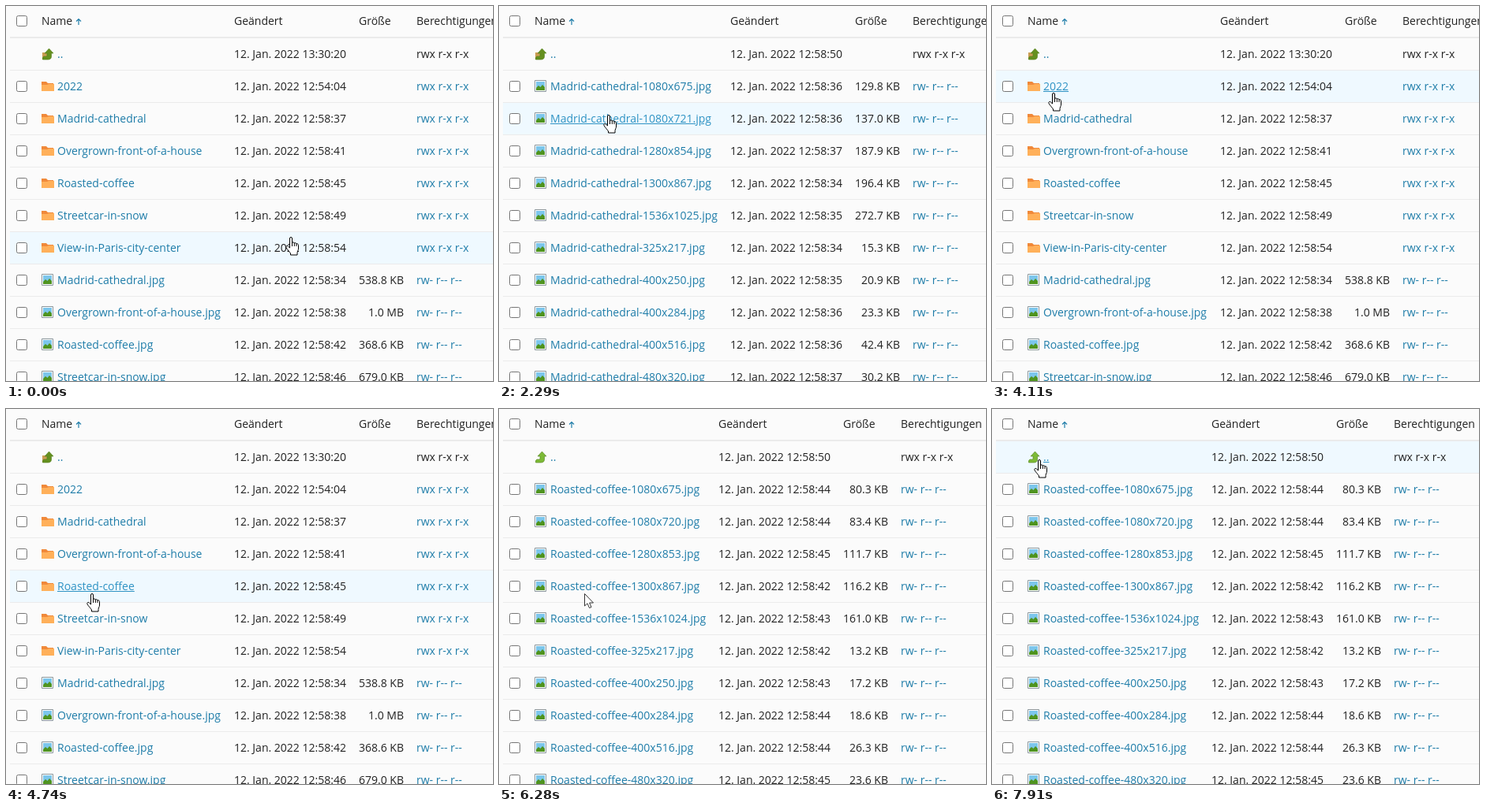
Animation, 617 px wide and 476 px high, one loop 8 s. Source, as an HTML page:

```html
<!DOCTYPE html>
<html lang="de">
<head>
<meta charset="utf-8">
<title>Dateimanager</title>
<style>
html, body { margin: 0; width: 100%; height: 100%; overflow: hidden; background: #fbfbfb; }
#stage { position: relative; width: 617px; height: 476px; overflow: hidden; font: 14px/20px "Open Sans", sans-serif; color: #222; }
.page { position: absolute; inset: 0; visibility: hidden; }
.page.show { visibility: visible; }
.head, .row { position: absolute; left: 5px; right: 0; box-sizing: border-box; height: 41px; border-bottom: 1px solid #ebebeb; }
.head { top: 0; border-bottom: 2px solid #ebebeb; }
.row.hover { background: #eff9ff; }
.head > *, .row > * { position: absolute; top: 10px; white-space: pre; }
.head > * { top: 9px; }
.box { left: 8px; width: 12px; height: 12px; border: 1px solid #767676; border-radius: 2.5px; background: #fff; }
.row .box { top: 13px; }
.head .box { top: 12px; }
.icon { left: 40px; width: 16px; height: 16px; }
.row .icon { top: 12px; }
.link { color: #1f7da9; }
.name { left: 60px; }
.name.over { color: #2f93c4; text-decoration: underline; }
.name.press { color: #1f7da9; }
#click, #hand, #arrow { position: absolute; left: 0; top: 0; overflow: visible; }
#click { width: 24px; height: 24px; margin: -12px; border-radius: 50%; background: #f6ec3c; opacity: .85; mix-blend-mode: multiply; }
</style>
</head>
<body>
<div id="stage">
  <div id="click"></div>
  <svg id="hand" width="18" height="24" fill="#fff" stroke="#000">
    <path d="M5.5 14V2a1.5 1.5 0 0 1 3 0V7.5C9 6.6 11 6.8 11.3 8 12 7.3 13.8 7.6 14 9 15 8.4 16.5 9 16.5 10.5V15C16.5 17 15 18.5 15 20.5V23H6.5V21C5.5 19 2.5 16.5 1 13.6 .2 12 2 10.8 3.2 11.8Z"/>
    <path fill="none" d="M8.5 7v5M11.3 8v4M14 9v3"/>
  </svg>
  <svg id="arrow" width="13" height="20" fill="#fff" stroke="#333">
    <path d="M.5.5V16L4 12.8 6.5 18.5 9 17.5 6.6 12H11.5Z"/>
  </svg>
</div>
<script>
const LOOP = 8000, ROW = 41;
const $ = id => document.getElementById(id);
const stage = $('stage');

const upArrow = color => `<path fill="${color}" stroke="#4f7f1c" stroke-width=".6" d="M9.5 1 15 7H12.5V11Q12.5 15 8 15H1.5Q1 11.5 3 11H6Q7 11 7 9.5V7H4Z"/>`;
const icons = {
  folder: '<path fill="#f0893a" d="M0 2H6L8 4H15V7H0Z"/><path fill="#ffb05a" d="M0 6H7L9 5H16V14H0Z"/>',
  image: '<path fill="#fff" stroke="#8b979c" d="M.5.5H14.5V14.5H.5Z"/><path fill="#7cc6ec" d="M2 2H13V13H2Z"/><path fill="#4f9420" d="M2 10 5 7 7.5 9 10 6 13 9V13H2Z"/>',
  upDark: '<path fill="#c99d52" d="M1 6H9V15H1Z"/>' + upArrow('#65901f'),
  upLight: upArrow('#7dba36')
};
const icon = name => `<svg class="icon">${icons[name]}</svg>`;
const box = '<i class="box"></i>';

function buildRow([name, time, size], i, shift, up) {
  const at = x => `left:${x + shift - 5}px`;
  const parent = i === 0, folder = !size;
  const kind = parent ? up : folder ? 'folder' : 'image';
  return `<div class="row" style="top:${ROW * (i + 1)}px">${parent ? '' : box}${icon(kind)}
    <span class="name link">${name}</span>
    <span style="${at(289)}">12. Jan. 2022 ${time}</span>
    <span style="right:${617 - 504 - shift}px">${size || ''}</span>
    <span class="${parent ? '' : 'link'}" style="${at(520)}">${folder ? 'rwx r-x r-x' : 'rw- r-- r--'}</span></div>`;
}

function buildPage(rows, shift, up) {
  const page = document.createElement('div');
  const title = (x, text) => `<span style="left:${x - 5}px">${text}</span>`;
  page.className = 'page';
  page.innerHTML = `<div class="head">${box}${title(45, 'Name')}
    <svg style="left:83px;top:15px" width="8" height="9" fill="none" stroke="#1f7da9" stroke-width="1.2"><path d="M4 9V1.5M1 4.5 4 1.5 7 4.5"/></svg>
    ${title(289 + shift, 'Geändert')}${title(447 + shift, 'Größe')}${title(520 + shift, 'Berechtigungen')}</div>`
    + rows.map((r, i) => buildRow(r, i, shift, up)).join('');
  stage.insertBefore(page, $('click'));
  return { page, rows: [...page.querySelectorAll('.row')] };
}

const parse = text => text.trim().split('\n').map(line => line.trim().split('|'));
const variants = (base, text) => [['..', '12:58:50'],
  ...parse(text).map(([dim, sec, kb]) => [`${base}-${dim}.jpg`, '12:58:' + sec, kb + ' KB'])];

const main = buildPage(parse(`
  ..|13:30:20
  2022|12:54:04
  Madrid-cathedral|12:58:37
  Overgrown-front-of-a-house|12:58:41
  Roasted-coffee|12:58:45
  Streetcar-in-snow|12:58:49
  View-in-Paris-city-center|12:58:54
  Madrid-cathedral.jpg|12:58:34|538.8 KB
  Overgrown-front-of-a-house.jpg|12:58:38|1.0 MB
  Roasted-coffee.jpg|12:58:42|368.6 KB
  Streetcar-in-snow.jpg|12:58:46|679.0 KB`), 0, 'upDark');
const madrid = buildPage(variants('Madrid-cathedral', `
  1080x675|36|129.8
  1080x721|36|137.0
  1280x854|37|187.9
  1300x867|34|196.4
  1536x1025|35|272.7
  325x217|34|15.3
  400x250|35|20.9
  400x284|36|23.3
  400x516|36|42.4
  480x320|37|30.2`), 4, 'upDark');
const coffee = buildPage(variants('Roasted-coffee', `
  1080x675|44|80.3
  1080x720|44|83.4
  1280x853|45|111.7
  1300x867|42|116.2
  1536x1024|43|161.0
  325x217|42|13.2
  400x250|43|17.2
  400x284|44|18.6
  400x516|44|26.3
  480x320|45|23.6`), -11, 'upLight');
const pages = [main, madrid, coffee];

const smooth = u => u * u * (3 - 2 * u);
const easeIn = u => u * u;
const easeOut = u => u * (2 - u);
// first step, last step, step count, x, y, easing
const moves = [
  [390, 800, 7, 132, 144, smooth],
  [2290, 2290, 1, 132, 138, smooth],
  [2360, 2980, 10, 56, 66, smooth],
  [3830, 4110, 5, 71, 110, easeIn],
  [4180, 4600, 7, 102, 229, easeOut],
  [4670, 4740, 2, 102, 234, smooth],
  [7210, 7210, 1, 102, 229, smooth],
  [7280, 7700, 7, 58, 18, smooth],
  [7770, 7910, 3, 53, 64, smooth]
];

function cursorAt(t) {
  let x = 354, y = 293;
  for (const [start, end, n, toX, toY, ease] of moves) {
    if (t < start) break;
    const step = (end - start) / (n - 1) || 1;
    const k = ease(Math.min(n, Math.floor((t - start) / step + 1e-6) + 1) / n);
    x += (toX - x) * k;
    y += (toY - y) * k;
  }
  return [Math.round(x), Math.round(y)];
}

const pageAt = t => t < 1350 ? main : t < 3560 ? madrid : t < 5820 ? main : t < 6280 ? null : coffee;
const within = (t, a, b) => t >= a && t < b;
const place = (el, x, y, shown) => {
  el.style.transform = `translate(${x}px,${y}px)`;
  el.style.visibility = shown ? 'visible' : 'hidden';
};

function draw(t) {
  const [x, y] = cursorAt(t), tip = x + 6;
  const current = pageAt(t);
  const pressed = within(t, 1270, 1350) || within(t, 3430, 3560) || within(t, 5670, 5820);
  const waiting = within(t, 5820, 6400);
  const hovered = within(t, 5820, 6340) ? -1 : Math.floor(y / ROW) - 1;

  for (const p of pages) p.page.classList.toggle('show', p === current);
  if (current) current.rows.forEach((row, i) => {
    const name = row.querySelector('.name');
    const over = i === hovered && tip >= 45 && tip <= 65 + name.offsetWidth
      && Math.abs(y - ROW * (i + 1) - 20) <= 10;
    row.classList.toggle('hover', i === hovered);
    name.classList.toggle('over', over);
    name.classList.toggle('press', over && pressed);
  });
  place($('click'), tip, y, pressed);
  place($('hand'), x, y, !waiting);
  place($('arrow'), tip, y, waiting);
}

function tick() {
  draw(performance.now() % LOOP);
  requestAnimationFrame(tick);
}
tick();
</script>
</body>
</html>
```
